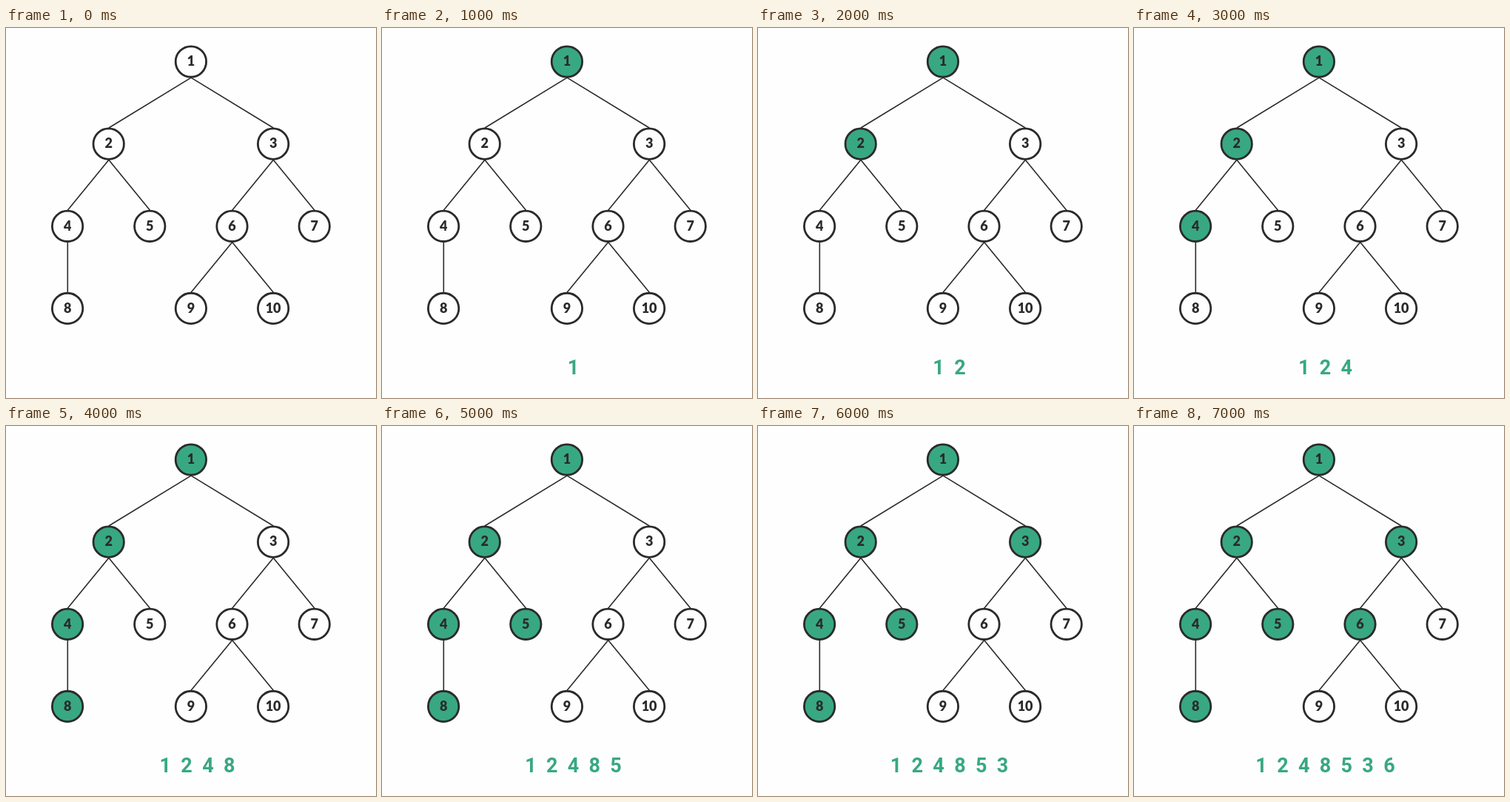
Write an HTML page with a canvas that moves like this. It is 500x500 px and loops after 8 s.

```html
<!DOCTYPE html>
<html lang="en">
<head>
<meta charset="utf-8">
<title>Preorder traversal</title>
<style>
  html, body { margin: 0; width: 100%; height: 100%; overflow: hidden; background: #fefefe; }
  canvas { display: block; width: 500px; height: 500px; }
</style>
</head>
<body>
<canvas id="stage" width="500" height="500"></canvas>
<script>
const ctx = document.getElementById('stage').getContext('2d');
const INK = '#2a2a2d', GREEN = '#38a882', PAPER = '#fefefe';
const STEP = 1000, LOOP = 8000;
const RADIUS = 20.7, EDGE_GAP = 21.6;
const ORDER = [1, 2, 4, 8, 5, 3, 6];

// label: [column, level, parent], columns in half node spacings
const TREE = {
  1: [3, 0], 2: [1, 1, 1], 3: [5, 1, 1],
  4: [0, 2, 2], 5: [2, 2, 2], 6: [4, 2, 3], 7: [6, 2, 3],
  8: [0, 3, 4], 9: [3, 3, 6], 10: [5, 3, 6]
};

function position(label) {
  const [column, level] = TREE[label];
  return { x: 83.1 + column * 55.6, y: 45.5 + level * 111.15 };
}

function drawEdge(from, to) {
  const a = position(from), b = position(to);
  ctx.beginPath();
  ctx.moveTo(a.x + 0.2, a.y + EDGE_GAP);
  ctx.lineTo(b.x + 0.2, b.y - EDGE_GAP);
  ctx.strokeStyle = INK;
  ctx.lineWidth = 1.6;
  ctx.stroke();
}

function drawNode(label, visited) {
  const { x, y } = position(label);
  ctx.beginPath();
  ctx.arc(x, y, RADIUS, 0, Math.PI * 2);
  ctx.fillStyle = visited ? GREEN : PAPER;
  ctx.fill();
  ctx.strokeStyle = INK;
  ctx.lineWidth = 2.8;
  ctx.stroke();
  ctx.fillStyle = INK;
  ctx.font = '900 18px Lato, sans-serif';
  ctx.fillText(label, x, y + 5.8);
}

function drawSequence(visited) {
  ctx.fillStyle = GREEN;
  ctx.font = 'bold 27px Roboto, sans-serif';
  const first = 258.5 - 14.4 * (visited.length - 1);
  visited.forEach((label, i) => ctx.fillText(label, first + i * 28.8, 468));
}

function draw(time) {
  const visited = ORDER.slice(0, Math.floor((time % LOOP) / STEP));
  ctx.fillStyle = PAPER;
  ctx.fillRect(0, 0, 500, 500);
  ctx.textAlign = 'center';
  const labels = Object.keys(TREE).map(Number);
  for (const label of labels) {
    const parent = TREE[label][2];
    if (parent) drawEdge(parent, label);
  }
  for (const label of labels) drawNode(label, visited.includes(label));
  drawSequence(visited);
}

const start = performance.now();
function tick() {
  draw(performance.now() - start);
  requestAnimationFrame(tick);
}
tick();
</script>
</body>
</html>
```
